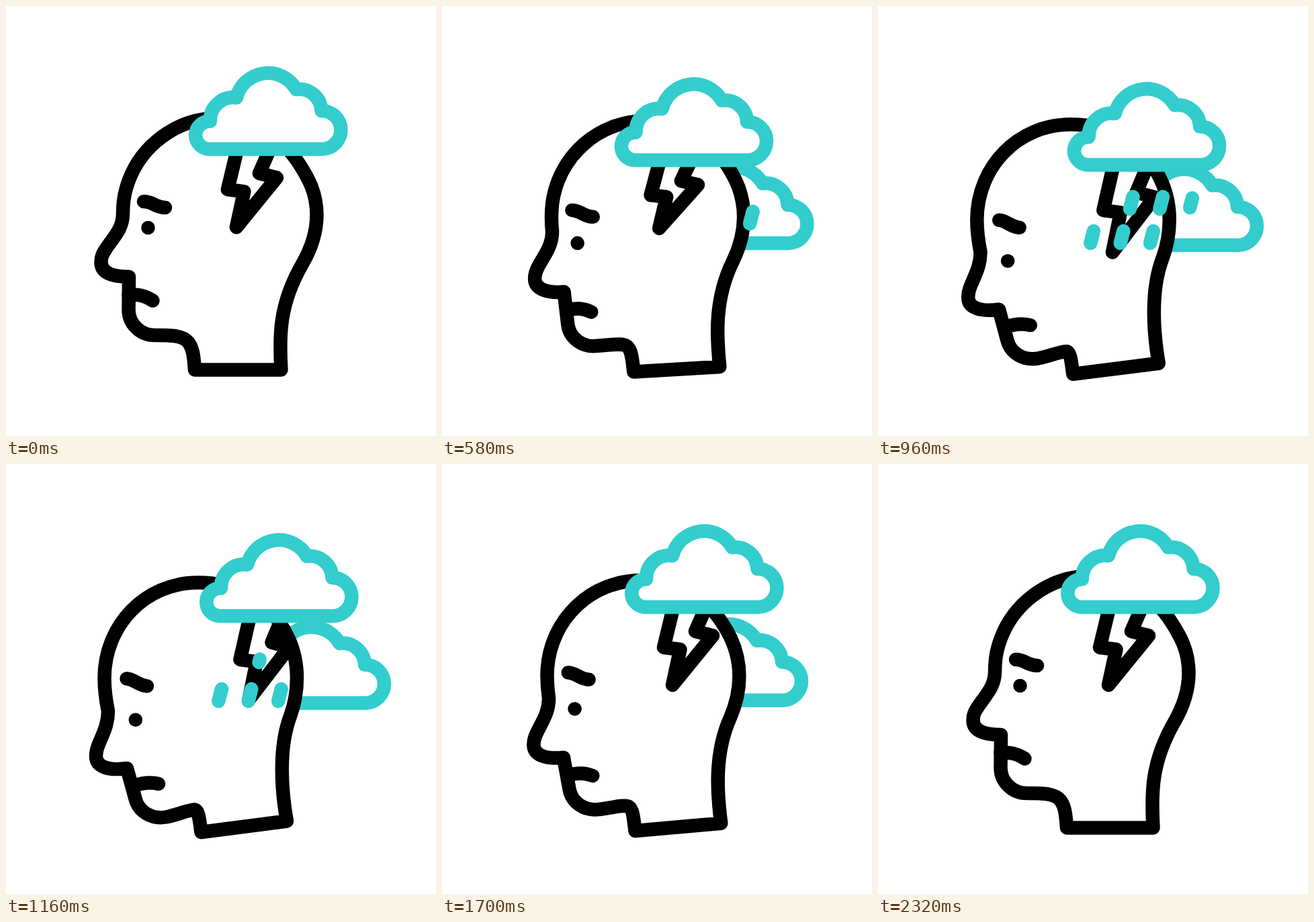
Animation, 640 px wide and 640 px high, one loop 2.4 s. Source, as an HTML page:

```html
<!DOCTYPE html>
<html lang="en">
<head>
<meta charset="utf-8">
<title>Stormy mind</title>
<style>
  html, body { margin: 0; width: 100%; height: 100%; overflow: hidden; background: #fff; }
  svg { display: block; width: 100vw; height: 100vh; }
  path { fill: none; stroke: #000; stroke-width: 20.5; stroke-linecap: round; stroke-linejoin: round; }
  .cloud { fill: #fff; stroke: #33cdcd; }
  #head { fill: #fff; }
  #rain path { stroke: #33cdcd; }
</style>
</head>
<body>
<svg viewBox="0 0 640 640">
  <defs>
    <path id="puff" class="cloud" d="M302 213A20.6 20.6 0 0 1 304 171.5A34 34 0 0 1 343 136.5A48.5 48.5 0 0 1 432 124A33 33 0 0 1 469.5 156A28 28 0 0 1 470.5 213Z"/>
    <clipPath id="skull"><use href="#head"/></clipPath>
  </defs>
  <use id="back" href="#puff"/>
  <path id="head"/>
  <path id="brow"/>
  <path id="mouth"/>
  <circle id="eye" r="10.3"/>
  <path id="bolt" clip-path="url(#skull)"/>
  <g id="rain"></g>
  <use id="front" href="#puff"/>
</svg>
<script>
const LOOP = 2400;
const { sin, cos, PI } = Math;
const $ = id => document.getElementById(id);
const clamp = v => Math.min(1, Math.max(0, v));
const part = (t, start, length) => clamp((t - start) / length);
const ease = v => (1 - cos(PI * v)) / 2;

// Blend two paths that share the same commands
function morph(from, to) {
  const end = to.match(/[\d.]+/g);
  return k => {
    let i = 0;
    return from.replace(/[\d.]+/g, n => (+n + (end[i++] - n) * k).toFixed(2));
  };
}

// Each shape upright and bowed
const shapes = {
  head: morph(
    `M281 541.5L409.5 541.5C406.5 490 406.5 444 441 384C452 365 462.5 338 462.5 311
     C462.5 278 450 256 437 236C412 196 368 166.5 318 166.5C253.5 166.5 197 209 179 271
     C175.5 283 174 296 174 309C174 331 161 343 149 361C145 367 141.5 372 141.5 381
     C141.5 397 158 403 183 403L182.5 452C182.5 473 200 490 221 490
     C246 490 262 490 271 500C279 510 279.5 524 281 541.5Z`,
    `M290.5 548L418 531.5C411 492 404 425 423.5 374C430 356 433 338 433 318
     C433 284 422 257 406 234.5C382 198 337 176.5 286 176.5C207 176.5 146.5 240 146.5 319
     C146.5 338 149 353 152 368C152 387 145 400 138 417C135.5 423 134 428 134 435
     C134 450 151 457 180 453L193 500C198 517 216 529 238 525.5
     C252 523 274 514 281 514.5C287 515.5 288 531 290.5 548Z`),
  brow: morph('M205 291C219 291 222 300 237 300', 'M179.5 319.5C191 320 197 330 210 330.5'),
  mouth: morph('M182.5 430C196 429 205 430 218.5 438.5', 'M190 479C204 474 215 473 227 476')
};

const move = (id, x, y) => $(id).setAttribute('transform', `translate(${x} ${y})`);

function drawHead(t) {
  const nod = ease(part(t, 166, 884)) - ease(part(t, 1312, 1016));
  for (const id in shapes) $(id).setAttribute('d', shapes[id](nod));
  move('eye', 211.5 - 18.7 * nod - 5.6 * nod * (1 - nod), 330 + 50.7 * nod);
}

function drawBack(t) {
  const out = sin(PI / 2 * part(t, 0, 945)) - part(t, 900, 1270) ** 3;
  move('back', -50 + 115.5 * out, 126 + 17 * out);
}

const bolt = [[350, 190], [330, 273], [354.5, 276], [343, 329], [403, 255.5], [377, 249], [403, 190]];

// The front cloud runs round an ellipse, the bolt swings with it and pulses twice
function drawStorm(t) {
  const u = 2 * PI * part(t, 0, 1680);
  const swing = sin(u), pulse = sin(2 * u);
  const turn = u - .33 * swing + .068 * pulse;
  const drop = 13.1 * (1 - cos(turn));
  move('front', -16 * sin(turn), drop);

  const w = 1 + .1 * pulse + .07 * swing, h = 1 + .18 * pulse + .06 * swing;
  const dx = 360 - 22 * swing - 1.5 * (1 - cos(u)), dy = 223 + drop + 2.3 * pulse;
  const points = bolt.map(([x, y]) => `${dx + (x - 360) * w} ${dy + (y - 223) * h}`);
  $('bolt').setAttribute('d', `M${points.join('L')}Z`);
}

// Two rows of three drops, right to left
const drops = Array.from({ length: 6 }, () =>
  $('rain').appendChild(document.createElementNS('http://www.w3.org/2000/svg', 'path')));

function drawDrop(el, i, t) {
  const row = Math.floor(i / 3), on = 520 + 64 * i, off = 945 + 80 * i;
  const size = part(t, on, 55) - part(t, off, 75);
  const shift = 22 * (1 - ease(part(t, on + 60, 60)));
  const at = v => `${466 - 44.4 * (i % 3) - 58.6 * row - .255 * v} ${293 + 51 * row + v}`;
  el.setAttribute('d', size > 0 ? `M${at(shift - 9 * size)}L${at(shift + 9 * size)}` : '');
}

function tick() {
  const t = performance.now() % LOOP;
  drawHead(t);
  drawBack(t);
  drawStorm(t);
  drops.forEach((el, i) => drawDrop(el, i, t));
  requestAnimationFrame(tick);
}
tick();
</script>
</body>
</html>
```
